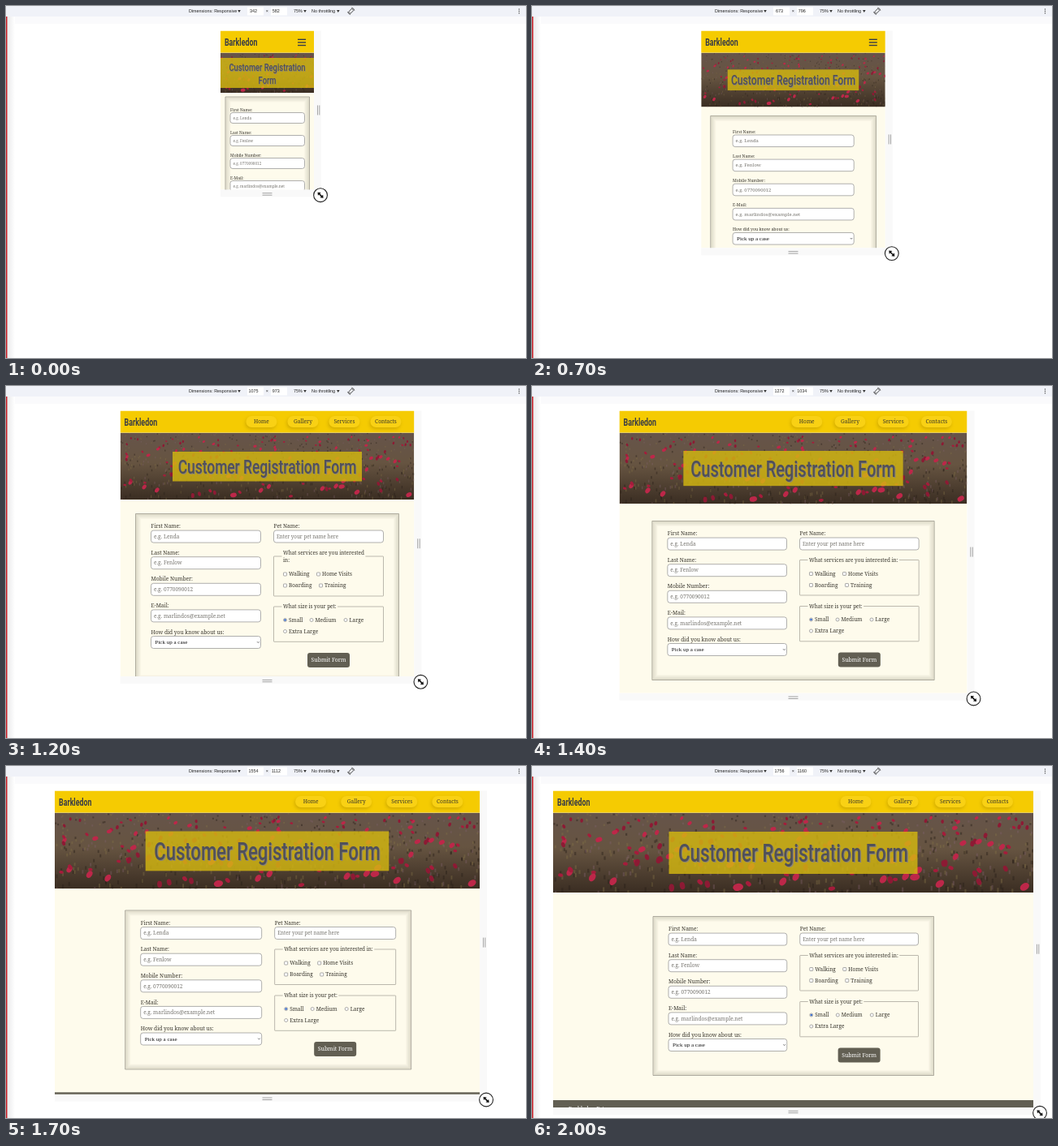
Write an HTML page with a canvas that moves like this. It is 640 by 434 pixels and loops after 2.1 s.

```html
<!DOCTYPE html>
<html lang="en">
<head>
<meta charset="utf-8">
<title>Responsive form</title>
<style>
html, body { margin: 0; width: 640px; height: 434px; overflow: hidden; background: #fff; }
canvas { display: block; }
</style>
</head>
<body>
<canvas id="stage" width="640" height="434"></canvas>
<script>
const g = document.getElementById('stage').getContext('2d');
const SERIF = '"Noto Serif", serif', SANS = '"Liberation Sans", sans-serif', HEAD = 'Roboto, sans-serif';
const SCALE = 0.3366, MID = 321.5, TOP = 30.5, NARROW = 0.71;

// Viewport size over time
const TIMES = [0, 200, 400, 600, 900, 1200, 1500, 1800, 2000];
const WIDTHS = [342, 385, 452, 596, 828, 1075, 1370, 1646, 1756];
const HEIGHTS = [582, 620, 673, 760, 867, 973, 1065, 1135, 1160];
// Layout over viewport width
const STOPS = [342, 452, 828, 1075, 1370, 1646, 1756];

function lerp(xs, ys, x) {
  let i = 1;
  while (i < xs.length - 1 && x > xs[i]) i++;
  const p = Math.min(1, Math.max(0, (x - xs[i - 1]) / (xs[i] - xs[i - 1])));
  return ys[i - 1] + (ys[i] - ys[i - 1]) * p;
}

function rect(x, y, w, h, color) {
  g.fillStyle = color;
  g.fillRect(x, y, w, h);
}

function frame(x, y, w, h, r, fill, line) {
  g.beginPath();
  g.roundRect(x, y, w, h, r);
  if (fill) { g.fillStyle = fill; g.fill(); }
  if (line) { g.strokeStyle = line; g.lineWidth = 0.7; g.stroke(); }
}

function text(s, x, y, size, color = '#38362f', family = SERIF, align = 'left') {
  g.font = `${size}px ${family}`;
  g.fillStyle = color;
  g.textAlign = align;
  g.textBaseline = 'alphabetic';
  g.fillText(s, x, y + size * 0.34);
}

function heading(s, x, y, size, weight, color, align) {
  g.save();
  g.translate(x, y + size * 0.36);
  g.scale(NARROW, 1);
  g.font = `${weight} ${size}px ${HEAD}`;
  g.fillStyle = color;
  g.textAlign = align;
  g.fillText(s, 0, 0);
  g.restore();
}

function seeded(seed) {
  return () => (seed = (seed * 16807) % 2147483647) / 2147483647;
}
const rnd = seeded(77);
const grass = Array.from({ length: 650 }, () => [rnd() - 0.5, rnd(), rnd()]);
const poppies = Array.from({ length: 150 }, () => [rnd() - 0.5, 0.06 + 0.9 * rnd() ** 1.3, rnd()]);

function triangle(x, y) {
  g.fillStyle = '#333';
  g.beginPath();
  g.moveTo(x, y - 1.3);
  g.lineTo(x + 3.6, y - 1.3);
  g.lineTo(x + 1.8, y + 1.6);
  g.fill();
}

function toolbar(w, h) {
  rect(0, 13, 640, 9, '#fafafc');
  rect(0, 0, 640, 13, '#f0f2f8');
  const shade = g.createLinearGradient(1, 0, 11, 0);
  shade.addColorStop(0, '#e9e9ea');
  shade.addColorStop(1, '#ffffff');
  rect(0, 13, 11, 421, shade);
  rect(0, 13, 1.5, 421, '#c8232b');
  rect(297, 1.5, 20, 10, '#fff');
  rect(326, 1.5, 20, 10, '#fff');
  const label = (s, x, align) => text(s, x, 6.3, 5.4, '#222', SANS, align);
  label('Dimensions: Responsive', 225);
  triangle(285.2, 6.3);
  label(Math.round(w), 304.5, 'center');
  label('×', 321.3, 'center');
  label(Math.round(h), 332.3, 'center');
  label('75%', 354);
  triangle(366.2, 6.3);
  label('No throttling', 376);
  triangle(407, 6.3);
  g.strokeStyle = '#444';
  g.lineWidth = 0.9;
  g.save();
  g.translate(424.7, 6.3);
  g.rotate(Math.PI / 4);
  g.strokeRect(-1.6, -2.8, 3.2, 5.6);
  g.restore();
  g.beginPath();
  g.arc(424.7, 6.3, 4.2, -1.4, -0.2);
  g.moveTo(423.9, 10.4);
  g.arc(424.7, 6.3, 4.2, 1.75, 2.95);
  g.stroke();
  for (const y of [4, 6.4, 8.8]) rect(630.9, y - 0.6, 1.2, 1.2, '#444');
}

function handles(right, bottom, w, h) {
  rect(right, TOP, 9, h + 9, '#f9f9f9');
  rect(right - w, bottom, w, 9, '#f9f9f9');
  const y = TOP + h / 2;
  for (const d of [-1.6, 0.8]) {
    rect(right + 5.5 + d, y - 6, 0.9, 12, '#999');
    rect(MID - 6, bottom + 5.5 + d, 12, 0.9, '#999');
  }
}

function cursor(x, y) {
  g.beginPath();
  g.arc(x, y, 8.4, 0, 7);
  g.fillStyle = '#fff';
  g.fill();
  g.strokeStyle = '#222';
  g.lineWidth = 1.1;
  g.stroke();
  g.save();
  g.translate(x, y);
  g.rotate(Math.PI / 4);
  rect(-3, -0.8, 6, 1.6, '#111');
  for (const s of [-1, 1]) {
    g.beginPath();
    g.moveTo(s * 5, 0);
    g.lineTo(s * 1.8, -2.6);
    g.lineTo(s * 1.8, 2.6);
    g.fill();
  }
  g.restore();
}

function navbar(left, right, vw) {
  rect(left, TOP, right - left, 27, '#f5cb02');
  heading('Barkledon', left + 5, 44.3, 12.5, 700, '#3a3d45', 'left');
  if (vw < 768) {
    for (const y of [40.6, 44.2, 47.8]) rect(right - 20, y, 10, 1.4, '#3a3d45');
    return;
  }
  const pitch = lerp(STOPS, [48, 48, 48.7, 51, 54.3, 57, 58.2], vw);
  const last = right - lerp(STOPS, [31, 31, 31.5, 35, 39, 40, 44], vw);
  ['Home', 'Gallery', 'Services', 'Contacts'].forEach((s, i) => {
    const x = last - (3 - i) * pitch;
    g.save();
    g.shadowColor = 'rgba(165,130,0,.45)';
    g.shadowBlur = 4;
    g.shadowOffsetX = -1;
    g.shadowOffsetY = 2;
    frame(x - 19, 37, 38, 14, 7, '#f9d114');
    g.restore();
    text(s, x, 44, 6.6, '#3a382c', SERIF, 'center');
  });
}

function field(left, w, bottom) {
  const y0 = 57.5, h = bottom - y0, unit = Math.max(w, 260) / 591;
  g.save();
  g.beginPath();
  g.rect(left, y0, w, h);
  g.clip();
  const tone = g.createLinearGradient(0, y0, 0, bottom);
  tone.addColorStop(0, '#66544a');
  tone.addColorStop(0.45, '#665441');
  tone.addColorStop(1, '#3a2d22');
  rect(left, y0, w, h, tone);
  const wide = 591 * unit;
  for (const [u, v, c] of grass) {
    const color = c < 0.4 ? 'rgba(40,32,25,.45)' : c < 0.75 ? 'rgba(130,112,70,.4)' : 'rgba(125,95,105,.4)';
    rect(MID + u * wide, y0 + v * h, 2.2 * unit, (2 + 4 * v) * unit, color);
  }
  for (const [u, v, c] of poppies) {
    const r = (1.4 + 3.2 * v ** 0.6 * (0.4 + c)) * unit;
    g.fillStyle = ['#a51c3b', '#8d1a34', '#bd2749'][Math.floor(c * 3)];
    g.beginPath();
    g.ellipse(MID + u * wide, y0 + v * h, r * 1.15, r * 0.8, c * 3, 0, 7);
    g.fill();
  }
  g.restore();
}

function hero(left, w, vw) {
  const at = ys => lerp(STOPS, ys, vw), wrap = vw < 400;
  field(left, w, at([107, 115, 131, 140, 148, 153, 156]));
  const y1 = wrap ? 64 : at([76, 76, 80, 81, 79.5, 81, 81]);
  const y2 = wrap ? 101 : at([97, 97, 109, 117.5, 126, 131, 133]);
  const half = wrap ? w / 2 : at([62.5, 62.5, 93.5, 116.5, 144.5, 152.5, 153]);
  rect(MID - half, y1, half * 2, y2 - y1, 'rgba(214,186,16,.8)');
  const size = at([13.2, 13.2, 19.8, 24.5, 30, 31.6, 31.6]);
  const title = (s, y) => {
    heading(s, MID + size * 0.035, y + size * 0.035, size, 500, '#8d8674', 'center');
    heading(s, MID, y, size, 500, '#50505a', 'center');
  };
  if (wrap) {
    title('Customer Registration', 75.5);
    title('Form', 91.3);
  } else title('Customer Registration Form', (y1 + y2) / 2);
}

const FIELDS = [
  ['First Name:', 'e.g. Lenda'],
  ['Last Name:', 'e.g. Fenlow'],
  ['Mobile Number:', 'e.g. 0770090012'],
  ['E-Mail:', 'e.g. marlindos@example.net'],
  ['How did you know about us:', 'Pick up a case']
];

function input(x, y, w, h, hint, size, select) {
  frame(x, y - h / 2, w, h, 3, '#fff', '#8f8f8f');
  if (!select) return text(hint, x + 3.5, y, size, '#77756f');
  text(hint, x + 5, y, 7, '#111', '"Liberation Serif", serif');
  g.strokeStyle = '#444';
  g.beginPath();
  g.moveTo(x + w - 4.5, y - 0.8);
  g.lineTo(x + w - 3.2, y + 0.6);
  g.lineTo(x + w - 1.9, y - 0.8);
  g.stroke();
}

function option(x, y, s, radio, on) {
  frame(x + 12, y - 2, 4, 4, radio ? 2 : 0.6, '#fff', '#888');
  if (on) frame(x + 12.8, y - 1.2, 2.4, 2.4, 1.2, '#2a62c8');
  text(s, x + 18.5, y, 6.5);
}

function fieldset(x, y, w, h, lines) {
  frame(x, y, w, h, 0.5, null, '#a09d92');
  g.font = `6.4px ${SERIF}`;
  const wide = Math.max(...lines.map(s => g.measureText(s).width));
  rect(x + 10, y - 2, wide + 3, 4, '#fefbec');
  lines.forEach((s, i) => text(s, x + 11.5, y - (lines.length - 1) * 4.5 + i * 9, 6.4));
}

function choices(x, top, w) {
  const wrap = w < 140, shift = wrap ? 9.5 : 0, y = top + shift;
  text('Pet Name:', x, top + 15.5, 6.6);
  input(x, top + 28, w, 15, 'Enter your pet name here', 6.2);
  fieldset(x, top + (wrap ? 52.5 : 48), w, wrap ? 49 : 43.5,
    wrap ? ['What services are you interested', 'in:'] : ['What services are you interested in:']);
  option(x, y + 65, 'Walking');
  option(x + 41, y + 65, 'Home Visits');
  option(x, y + 79, 'Boarding');
  option(x + 44, y + 79, 'Training');
  fieldset(x, y + 105, w, 43.3, ['What size is your pet:']);
  option(x, y + 121.5, 'Small', true, true);
  option(x + 32.5, y + 121.5, 'Medium', true);
  option(x + 74.5, y + 121.5, 'Large', true);
  option(x, y + 135.5, 'Extra Large', true);
  frame(x + w / 2 - 26, y + 162, 52, 18, 3, '#625f53');
  text('Submit Form', x + w / 2, y + 171, 6.9, '#fff', SERIF, 'center');
  return shift;
}

function form(left, w, vw) {
  const at = ys => lerp(STOPS, ys, vw), two = vw >= 950;
  const x1 = at([270, 253, 196.5, 159.5, 142, 149, 149]);
  const x2 = at([373.5, 390, 447, 483.5, 501, 497.5, 494.5]);
  const top = at([112, 122.5, 144.5, 157.5, 171, 181.5, 185.5]);
  const single = (a, b, c, d) => two ? d : lerp(STOPS.slice(0, 3), [a, b, c], vw);
  const pad = single(6, 18.5, 33.5, 19);
  const inner = x2 - x1 - 2 * pad, col = two ? (inner - 16) / 2 : inner;
  const wrapShift = two && col < 140 ? 9.5 : 0;
  const height = two ? 196 + wrapShift : 420;

  for (let i = 1; i < 7; i++) {
    g.strokeStyle = `rgba(105,100,75,${0.24 - i * 0.034})`;
    g.lineWidth = 1;
    g.strokeRect(x1 + i, top + i, x2 - x1 - 2 * i, height - 2 * i);
  }
  frame(x1, top, x2 - x1, height, 0, null, '#8f8c80');

  const x = x1 + pad, pitch = single(28, 29.3, 30.7, 32.6);
  FIELDS.forEach(([name, hint], i) => {
    const y = top + single(16, 16.5, 21.5, 15.5) + i * pitch;
    text(name, x, y, single(4.95, 5, 5.2, 6.6));
    input(x, y + single(10, 10.5, 12, 12.6), col, single(13, 14, 15, 15), hint, single(4.7, 5.2, 6.4, 6.5), i === 4);
  });
  if (!two) return;
  choices(x + col + 16, top, col);
  const foot = top + height + lerp(STOPS, [28, 28, 28, 28, 28, 28.5, 30.5], vw);
  rect(left, foot, w, 60, '#625f53');
  text('Barkledon Pets', left + 19, foot + 10.5, 6.6, '#fff');
}

function draw(now) {
  const t = Math.floor(now % 2100 / 100) * 100;
  const vw = lerp(TIMES, WIDTHS, t), vh = lerp(TIMES, HEIGHTS, t);
  const w = vw * SCALE, h = vh * SCALE, left = MID - w / 2, right = left + w, bottom = TOP + h;
  rect(0, 0, 640, 434, '#fff');
  toolbar(vw, vh);
  handles(right, bottom, w, h);
  g.save();
  g.beginPath();
  g.rect(left, TOP, w, h);
  g.clip();
  rect(left, TOP, w, h, '#fefbec');
  hero(left, w, vw);
  navbar(left, right, vw);
  form(left, w, vw);
  g.restore();
  cursor(right + 8, bottom + 6.8);
}

function tick() {
  draw(performance.now());
  requestAnimationFrame(tick);
}
tick();
</script>
</body>
</html>
```
